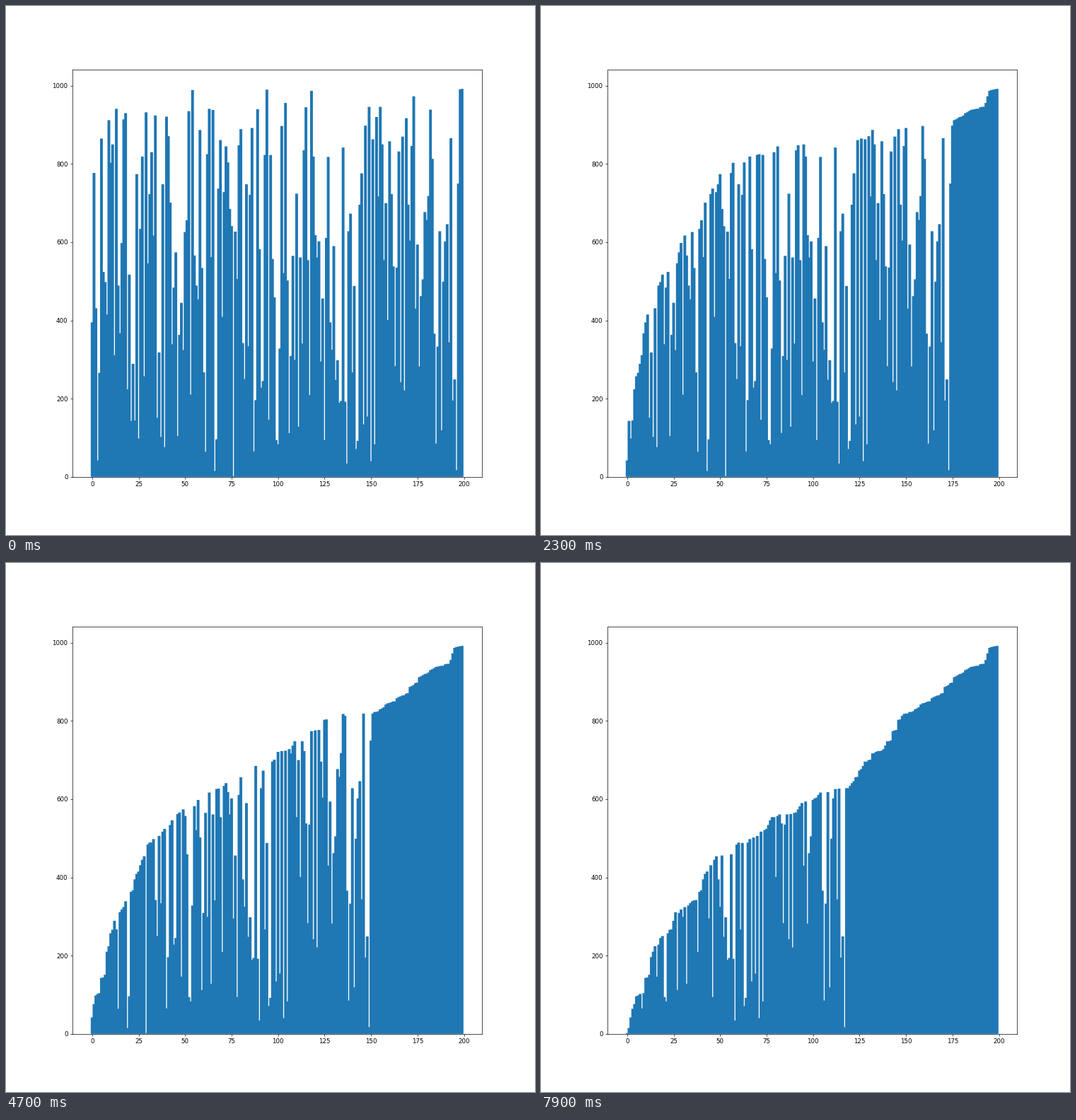
Recreate the animation shown at these times as a matplotlib script. Size 748 by 748 pixels, loop 8000 ms.

```python
import random

import matplotlib.pyplot as plt
from matplotlib.animation import FuncAnimation

SIZE = 748          # stage side in pixels
INCHES = 12
COUNT = 200
FRAMES = 80
FIRST_PASS = 2      # passes already done when the loop starts


def bubble_pass(values):
    """Return a copy of values after one full bubble sort pass."""
    out = list(values)
    for i in range(len(out) - 1):
        if out[i] > out[i + 1]:
            out[i], out[i + 1] = out[i + 1], out[i]
    return out


random.seed(0)
state = [random.randint(1, 1000) for _ in range(COUNT)]
for _ in range(FIRST_PASS):
    state = bubble_pass(state)

states = [state]
while len(states) < FRAMES:
    states.append(bubble_pass(states[-1]))

fig, ax = plt.subplots(figsize=(INCHES, INCHES), dpi=SIZE / INCHES)
bars = ax.bar(range(COUNT), states[0], width=1.5, color="#1f77b4")
for bar in bars:
    bar.set_snap(False)


def update(frame):
    for bar, height in zip(bars, states[frame]):
        bar.set_height(height)
    return bars.patches


anim = FuncAnimation(fig, update, frames=FRAMES, interval=100,
                     repeat=True, repeat_delay=0, blit=False)
plt.show()
```
